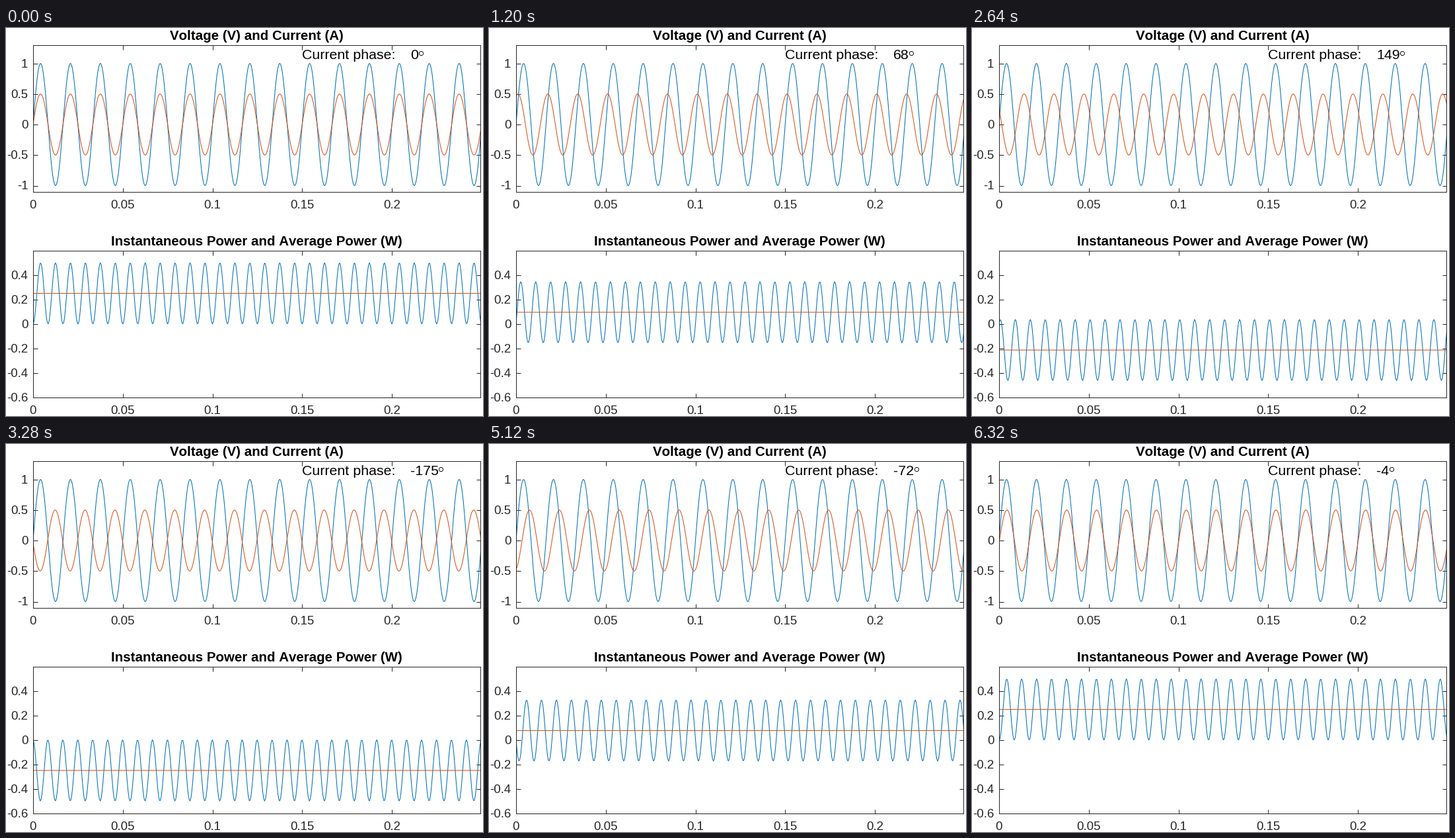
Recreate the animation shown at these times as a matplotlib script. Size 722 by 587 pixels, loop 6400 ms.

```python
import numpy as np
import matplotlib.pyplot as plt
from matplotlib.animation import FuncAnimation
from matplotlib.lines import Line2D

W, H, DPI = 722, 587, 64
PT = 72 / DPI  # points per pixel
FRAMES, INTERVAL = 80, 80
BLUE, ORANGE, INK = "#0072BD", "#D95319", "#262626"
LEFT, RIGHT = 41.0, 718.45
FREQ, STEP, SAMPLES = 60, 0.0005, 500
TICK_SIZE, TITLE_SIZE, NOTE_SIZE = 18.67, 20.53, 21.33

plt.rcParams["font.family"] = "Liberation Sans"
plt.rcParams["text.kerning_factor"] = 6

t = STEP * np.arange(SAMPLES)
omega_t = 2 * np.pi * FREQ * t
voltage = np.sin(omega_t)

fig = plt.figure(figsize=(W / DPI, H / DPI), dpi=DPI, facecolor="white")


def put_text(x, y, s, size, color="black", **kw):
    """Place text with its baseline at pixel (x, y), measured from the top."""
    return fig.text(x / W, 1 - y / H, s, fontsize=size * PT, color=color,
                    va="baseline", **kw)


def make_panel(top, bottom, ylim, yticks, title):
    ax = fig.add_axes([LEFT / W, 1 - bottom / H,
                       (RIGHT - LEFT) / W, (bottom - top) / H])
    ax.set_xlim(0, t[-1])
    ax.set_ylim(*ylim)
    xticks = [0, 0.05, 0.1, 0.15, 0.2]
    ax.set_xticks(xticks)
    ax.set_yticks(yticks)
    ax.tick_params(direction="in", length=6.5 * PT, width=PT, color=INK,
                   top=True, right=True, labelbottom=False, labelleft=False)
    for spine in ax.spines.values():
        spine.set(linewidth=PT, color=INK)
    for v in xticks:
        x = LEFT + (RIGHT - LEFT) * v / t[-1]
        put_text(x, bottom + 25.25, f"{v:g}", TICK_SIZE, INK, ha="center")
    for v in yticks:
        y = bottom - (bottom - top) * (v - ylim[0]) / (ylim[1] - ylim[0])
        put_text(33.3, y + 6, f"{v:g}", TICK_SIZE, INK, ha="right")
    put_text((LEFT + RIGHT) / 2, top - 7.75, title, TITLE_SIZE,
             ha="center", weight="bold")
    return ax


def add_line(ax, x, y, color):
    line, = ax.plot(x, y, color=color, lw=1.05 * PT, snap=False)
    return line


signals = make_panel(25.75, 247.75, (-1.1, 1.3), [-1, -0.5, 0, 0.5, 1],
                     "Voltage (V) and Current (A)")
powers = make_panel(336.75, 558.75, (-0.6, 0.6),
                    [-0.6, -0.4, -0.2, 0, 0.2, 0.4],
                    "Instantaneous Power and Average Power (W)")

add_line(signals, t, voltage, BLUE)
current_line = add_line(signals, t, voltage / 2, ORANGE)
power_line = add_line(powers, t, voltage ** 2 / 2, BLUE)
mean_line = add_line(powers, t[[0, -1]], [0.25, 0.25], ORANGE)

NOTE_X, VALUE_X, NOTE_Y = 447.9, 612, 47
put_text(NOTE_X, NOTE_Y, "Current phase:", NOTE_SIZE)
value = put_text(VALUE_X, NOTE_Y, "0", NOTE_SIZE)
ring = Line2D([0], [1 - 38 / H], marker="o", ms=6.2 * PT, mfc="none",
              mec="black", mew=0.9 * PT, transform=fig.transFigure)
fig.add_artist(ring)


def advance(s):
    """Width in pixels of a signed whole number."""
    return NOTE_SIZE * sum(0.333 if c == "-" else 0.556 for c in s)


def update(i):
    degrees = 360 * i / FRAMES
    phase = np.radians(degrees)
    current = 0.5 * np.sin(omega_t + phase)
    current_line.set_ydata(current)
    power_line.set_ydata(voltage * current)
    mean_line.set_ydata([0.25 * np.cos(phase)] * 2)

    shown = int(degrees + 0.5)
    label = str(shown - 360 if shown > 180 else shown)
    value.set_text(label)
    ring.set_xdata([(VALUE_X + advance(label) + 3.7) / W])
    return current_line, power_line, mean_line, value, ring


anim = FuncAnimation(fig, update, frames=FRAMES, interval=INTERVAL,
                     repeat=True, repeat_delay=0, blit=False)
plt.show()
```
